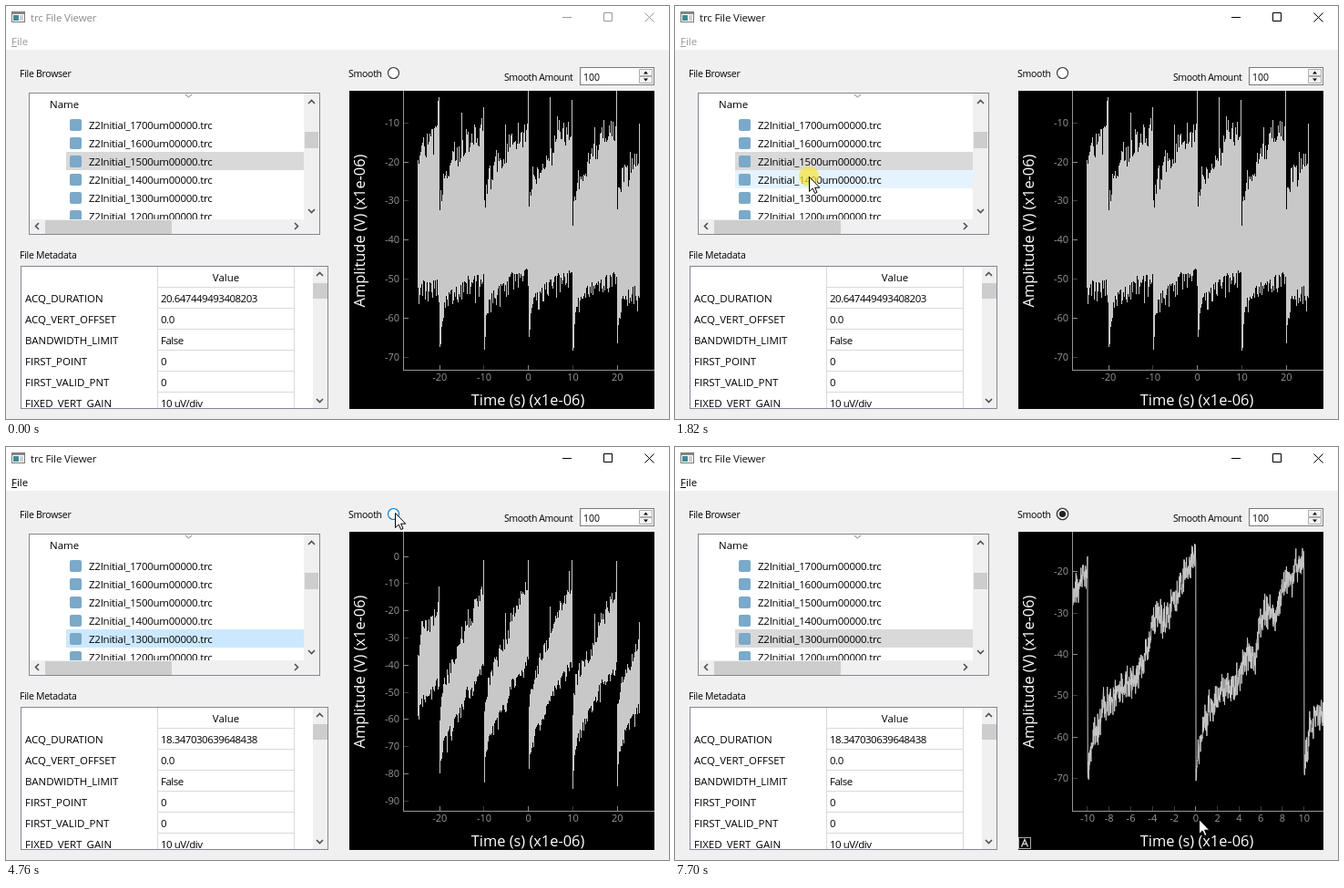
Recreate the animation shown at these times as an HTML page with a canvas. Size 728 by 453 pixels, loop 8 s.

```html
<!DOCTYPE html>
<html lang="en">
<head>
<meta charset="utf-8">
<title>trc File Viewer</title>
<style>
html, body { margin: 0; width: 728px; height: 453px; overflow: hidden; background: #f0f0f0; }
body { position: relative; font: 11.5px/16px "Open Sans", "Noto Sans", sans-serif; color: #000; cursor: default; }
body > *, .box > *, .box div { position: absolute; box-sizing: border-box; white-space: pre; }
#top { left: 0; top: 0; width: 728px; height: 48px; background: #fff; }
.box { overflow: hidden; background: #fff; border: 1px solid #828790; }
#list { left: 25px; top: 95px; width: 320px; height: 156px; }
#meta { left: 16px; top: 285px; width: 338px; height: 157px; }
.rows { overflow: hidden; }
#files { left: 0; top: 24px; width: 301px; height: 114px; }
#files .row { left: 40px; width: 261px; height: 20px; padding: 3px 0 0 25px; letter-spacing: -.25px; }
#files .row i { position: absolute; left: 4px; top: 4px; width: 13px; height: 13px; border-radius: 2px; background: #7ba9c9; }
#fields { left: 0; top: 23px; width: 320px; height: 132px; }
#fields .key { left: 0; width: 149px; height: 23px; padding: 4px 0 0 4px; }
#fields .val { left: 149px; width: 151px; height: 23px; padding: 4px 0 0 3px; border: solid #d9d9d9; border-width: 0 1px 1px; letter-spacing: -.5px; }
.bar { background: #f0f0f0; }
.thumb { background: #cdcdcd; }
.label { font-size: 10.5px; letter-spacing: -.27px; }
.spin { left: 630px; top: 67px; width: 82px; height: 20px; background: #fff; border: 1px solid #7a7a7a; }
svg, #plot { display: block; }
#plot { left: 377px; top: 93px; }
#flash { left: -11px; top: -11px; width: 22px; height: 22px; border-radius: 50%; background: #f7e43c; opacity: .72; }
#pointer > * { position: absolute; }
#arrow, #split { left: 0; top: 0; overflow: visible; }
</style>
</head>
<body>
<div id="top"></div>
<div id="title" style="left:27px;top:5px;letter-spacing:-.12px">trc File Viewer</div>
<div id="menu" style="left:6px;top:31px"><u>F</u>ile</div>

<div class="label" style="left:15px;top:66px">File Browser</div>
<div class="label" style="left:15px;top:265px">File Metadata</div>
<div class="label" style="left:376px;top:66px">Smooth</div>
<div class="label" style="left:547px;top:70px;letter-spacing:-.4px">Smooth Amount</div>
<div class="spin"></div>
<div class="label" style="left:634px;top:70px;letter-spacing:0">100</div>

<div class="box" id="list">
  <div style="left:22px;top:4px">Name</div>
  <div class="rows" id="files"></div>
  <div class="bar" style="left:301px;top:0;width:17px;height:154px"></div>
  <div class="bar" style="left:0;top:138px;width:301px;height:17px"></div>
  <div class="thumb" style="left:302px;top:42px;width:15px;height:18px"></div>
  <div class="thumb" style="left:17px;top:139px;width:139px;height:15px"></div>
</div>

<div class="box" id="meta">
  <div style="left:149px;top:0;width:151px;height:23px;padding-top:4px;text-align:center;border:solid #d9d9d9;border-width:0 1px 1px">Value</div>
  <div class="rows" id="fields"></div>
  <div class="bar" style="left:320px;top:0;width:17px;height:155px"></div>
  <div class="thumb" style="left:320px;top:18px;width:16px;height:17px"></div>
</div>

<canvas id="plot" width="335" height="349"></canvas>

<svg style="left:0;top:0" width="728" height="453" fill="none">
  <rect x="6.5" y="6.5" width="14" height="11" fill="#fff" stroke="#777"/>
  <rect x="7" y="7" width="13" height="2" fill="#888"/>
  <rect x="8" y="10" width="6" height="6" fill="#3f8a94"/>
  <rect x="15" y="10" width="4" height="6" fill="#c8d3d8"/>
  <path id="buttons" d="M611 12.5h10M656.5 7.5h9v9h-9zM701.5 7.5l10 10M711.5 7.5l-10 10"/>
  <path d="M197 97l3.5 3 3.5-3" stroke="#777"/>
  <path d="M332 107l3.5-3.5 3.5 3.5M332 223l3.5 3.5 3.5-3.5M36 238l-3.5 3.5 3.5 3.5M317 238l3.5 3.5-3.5 3.5M341 296l3.5-3.5 3.5 3.5M341 431l3.5 3.5 3.5-3.5" stroke="#505050" stroke-width="1.6"/>
  <path d="M695.5 69.5h14v7h-14zM695.5 77.5h14v7h-14z" fill="#f4f4f4" stroke="#adadad"/>
  <path d="M700 74.5l2.5-3 2.5 3zM700 79.5l2.5 3 2.5-3z" fill="#000"/>
  <circle id="ring" cx="425.5" cy="73.5" r="6" fill="#fff" stroke-width="1.1"/>
  <g id="checked">
    <circle cx="425.5" cy="73.5" r="6.5" stroke="#222" stroke-dasharray="1 1"/>
    <circle id="dot" cx="425.5" cy="73.5" r="3.6"/>
  </g>
  <g id="auto">
    <rect x="377.5" y="428.5" width="13" height="12" stroke="#aaa"/>
    <path d="M380.5 438.5l3.5-8 3.5 8M381.8 435.5h4.4" stroke="#c8c8c8" stroke-width="1.5"/>
  </g>
</svg>

<div id="pointer" style="left:0;top:0">
  <div id="flash"></div>
  <svg id="arrow" width="13" height="20">
    <path d="M.5 .5V16.5L4.2 13 6.7 18.5 9 17.5 6.6 12.2H11.8Z" fill="#fff" stroke="#000"/>
  </svg>
  <svg id="split" width="1" height="1">
    <path d="M0-11.5L4.5-6.5H1.5V-2.5H9.5V-.5H-9.5V-2.5H-1.5V-6.5H-4.5ZM0 11.5L4.5 6.5H1.5V2.5H9.5V.5H-9.5V2.5H-1.5V6.5H-4.5Z" fill="#fff" stroke="#000"/>
  </svg>
</div>

<script>
const LOOP = 8000, START = 588, STEP = 77;
const $ = id => document.getElementById(id);
const mix = (a, b, u) => a + (b - a) * u;
const show = (id, on) => { $(id).style.visibility = on ? 'visible' : 'hidden'; };

function seeded(s) {
  return () => {
    s = (s + 0x6D2B79F5) | 0;
    let r = Math.imul(s ^ (s >>> 15), 1 | s);
    r = (r + Math.imul(r ^ (r >>> 7), 61 | r)) ^ r;
    return ((r ^ (r >>> 14)) >>> 0) / 4294967296;
  };
}

// List and table rows
function add(parent, cls, top, text) {
  const el = document.createElement('div');
  el.className = cls;
  el.style.top = top + 'px';
  el.textContent = text;
  $(parent).append(el);
  return el;
}
const files = [...Array(6).keys()].map(i => {
  const el = add('files', 'row', i * 20, `Z2Initial_${17 - i}00um00000.trc`);
  el.prepend(document.createElement('i'));
  return el;
});
const fields = Object.entries({
  ACQ_DURATION: '', ACQ_VERT_OFFSET: '0.0', BANDWIDTH_LIMIT: 'False',
  FIRST_POINT: '0', FIRST_VALID_PNT: '0', FIXED_VERT_GAIN: '10 uV/div'
}).map(([k, v], i) => ({ key: add('fields', 'key', i * 23, k), val: add('fields', 'val', i * 23, v) }));

// Sawtooth signals in microvolts: each ramp climbs from..to, half is the noise band
const traces = [
  { zero: 85, unit: 4.283, from: -43.5, to: -30, half: 15, bend: .7, duration: '20.647449493408203' },
  { zero: 134, unit: 3.425, from: -47, to: -25, half: 14, bend: .85, duration: '18.89897918701172' },
  { zero: 119.5, unit: 2.983, from: -62, to: -24, half: 10, bend: .9, duration: '18.347030639648438' },
  { zero: 45.8, unit: 4.533, from: -57, to: -16, half: 0, bend: 1.3, duration: '18.347030639648438' }
];
const MID = 573.7, SCALE = 4.875, ANCHOR = 575, NOTCH = 1.346;

const phase = t => (t + 30) % 10 / 10;
const dip = t => Math.exp(-phase(t) / .04);

function ramp(tr, t) {
  const u = phase(t), rise = tr.to - tr.from;
  const bow = .2 * u * ((t - 5) / 25) ** 2;
  const bump = .08 * Math.exp(-(((u - .62) / .06) ** 2));
  return tr.from + rise * (u ** tr.bend - bow + bump);
}

function drawRaw(tr, seed, yOf) {
  const rnd = seeded(seed);
  let drift = 0;
  for (let x = 452; x < 696; x++) {
    const t = (x + .5 - MID) / SCALE;
    const mid = ramp(tr, t), half = tr.half + 4 * phase(t);
    drift = drift * .7 + (rnd() - .5) * 2.5;
    let top = mid + half - 7 * dip(t) + drift + 6 * rnd() ** 1.5 - 2;
    let low = mid - half - 12 * dip(t) - 5 * rnd() ** 2 + 2;
    if (rnd() < .05) top += 7 * rnd();
    if (rnd() < .05) low -= 7 * rnd();
    if ((t + 30) % 5 > 4.8) top += 9;
    const y = Math.round(yOf(top));
    g.fillRect(x, y, 1, Math.round(yOf(low)) - y);
  }
}

function drawSmooth(tr, X, yOf) {
  const rnd = seeded(11);
  let drift = 0;
  g.beginPath();
  for (let t = -25; t <= 25; t += 1 / 48) {
    drift = drift * .93 + (rnd() - .5) * 1.6;
    g.lineTo(X(t), yOf(ramp(tr, t) - 13 * dip(t) + drift + (rnd() + rnd() - 1) * 4.5));
  }
  g.lineJoin = 'bevel';
  g.stroke();
}

const g = $('plot').getContext('2d');

function drawPlot(n, notches) {
  const tr = traces[n], zoom = NOTCH ** notches;
  const X = t => ANCHOR + (MID + SCALE * t - ANCHOR) * zoom;
  const yOf = v => tr.zero - v * tr.unit;
  g.setTransform(1, 0, 0, 1, -377, -93);
  g.fillStyle = '#000';
  g.fillRect(377, 93, 335, 349);

  g.save();
  g.beginPath();
  g.rect(437, 93, 275, 306);
  g.clip();
  g.fillStyle = g.strokeStyle = '#c8c8c8';
  if (tr.half) drawRaw(tr, n + 4, yOf);
  else drawSmooth(tr, X, yOf);
  g.restore();

  g.fillStyle = '#969696';
  g.fillRect(436, 93, 1, 307);
  g.fillRect(436, 399, 276, 1);
  g.font = '11px "Open Sans", "Noto Sans", sans-serif';
  const tick = (v, x, y, w, h) => {
    g.globalAlpha = v % 20 ? .4 : .9;
    g.fillRect(Math.round(x), Math.round(y), w, h);
    g.globalAlpha = 1;
  };
  g.textAlign = 'right';
  for (let v = 10; v >= -90; v -= 10) {
    const y = yOf(v);
    if (y < 97 || y > 394) continue;
    tick(v, 437, y, 5, 1);
    g.fillText(v, 432, y + 4);
  }
  g.textAlign = 'center';
  const gap = notches > 2 ? 2 : 10;
  for (let v = -20; v <= 20; v += gap) {
    const x = X(v);
    if (x < 440 || x > 706) continue;
    tick(v, x - .5, 394, 1, 5);
    g.fillText(v, x, 411);
  }

  g.fillStyle = '#fff';
  g.font = '16.4px "Open Sans", "Noto Sans", sans-serif';
  g.fillText('Time (s) (x1e-06)', 573, 438);
  g.translate(393.5, 246.5);
  g.rotate(-Math.PI / 2);
  g.fillText('Amplitude (V) (x1e-06)', 0, 0);
}

// Pointer moves: begin, end, x, y; each slows down as it arrives
const moves = [
  [588, 1358, 147, 187], [2050, 2282, 153, 201], [2436, 2667, 154, 208],
  [3822, 3899, 227, 226], [3899, 4130, 420, 140], [4130, 4361, 452, 28], [4361, 4746, 427, 72],
  [5755, 6063, 607, 400], [6063, 6217, 585, 409], [6671, 6902, 575, 408]
];
function pointerAt(t) {
  if (t < START) return [-100, -100];
  const now = START + Math.floor((t - START) / STEP) * STEP;
  let x = 127, y = 432;
  for (const [a, b, toX, toY] of moves) {
    if (now < a) break;
    const u = 1 - (1 - Math.min(1, (now - a) / (b - a))) ** 1.6;
    x = mix(x, toX, u);
    y = mix(y, toY, u);
  }
  return [Math.round(x), Math.round(y)];
}
const inside = ([x, y], l, t, r, b) => x >= l && x < r && y >= t && y < b;
const during = (t, a, b) => t >= a && t < b;

let drawn = '';
function render(t) {
  const at = pointerAt(t), [x, y] = at;
  const trace = (t >= 2128) + (t >= 3138) + (t >= 5368);
  const notches = (t >= 7068) + (t >= 7148) + (t >= 7698);
  const view = trace + '/' + notches;
  if (drawn !== view) {
    drawn = view;
    drawPlot(trace, notches);
    fields[0].val.textContent = traces[trace].duration;
  }

  $('title').style.color = t < 1818 ? '#8c8c8c' : '#111';
  $('buttons').style.stroke = t < 1818 ? '#999' : '#000';
  $('menu').style.color = t < 1897 ? '#999' : '#000';

  const picked = 2 + (t >= 1897) + (t >= 2988);
  const focused = during(t, 1897, 5138);
  const over = inside(at, 66, 120, 327, 234) ? Math.floor((y - 120) / 20) : -1;
  files.forEach((el, i) => {
    el.style.background = i === picked ? (focused ? '#cce8ff' : '#d9d9d9') : i === over ? '#e5f3ff' : '';
  });
  const field = inside(at, 17, 309, 166, 441) ? Math.floor((y - 309) / 23) : -1;
  fields.forEach((f, i) => { f.key.style.background = i === field ? '#d9ebf9' : ''; });

  const hot = inside(at, 418, 66, 433, 81);
  $('ring').style.stroke = hot ? '#0078d7' : '#333';
  $('dot').style.fill = hot ? '#0078d7' : '#222';
  show('checked', t >= 5138);
  show('auto', inside(at, 377, 93, 712, 442));

  const sizing = during(t, 742, 819);
  show('arrow', !sizing);
  show('split', sizing);
  show('flash', during(t, 1818, 2050) || during(t, 2988, 3217) || during(t, 5138, 5217));
  $('pointer').style.transform = `translate(${x}px, ${y}px)`;
}

const born = performance.now();
function frame() {
  render((performance.now() - born) % LOOP);
  requestAnimationFrame(frame);
}
frame();
</script>
</body>
</html>
```
